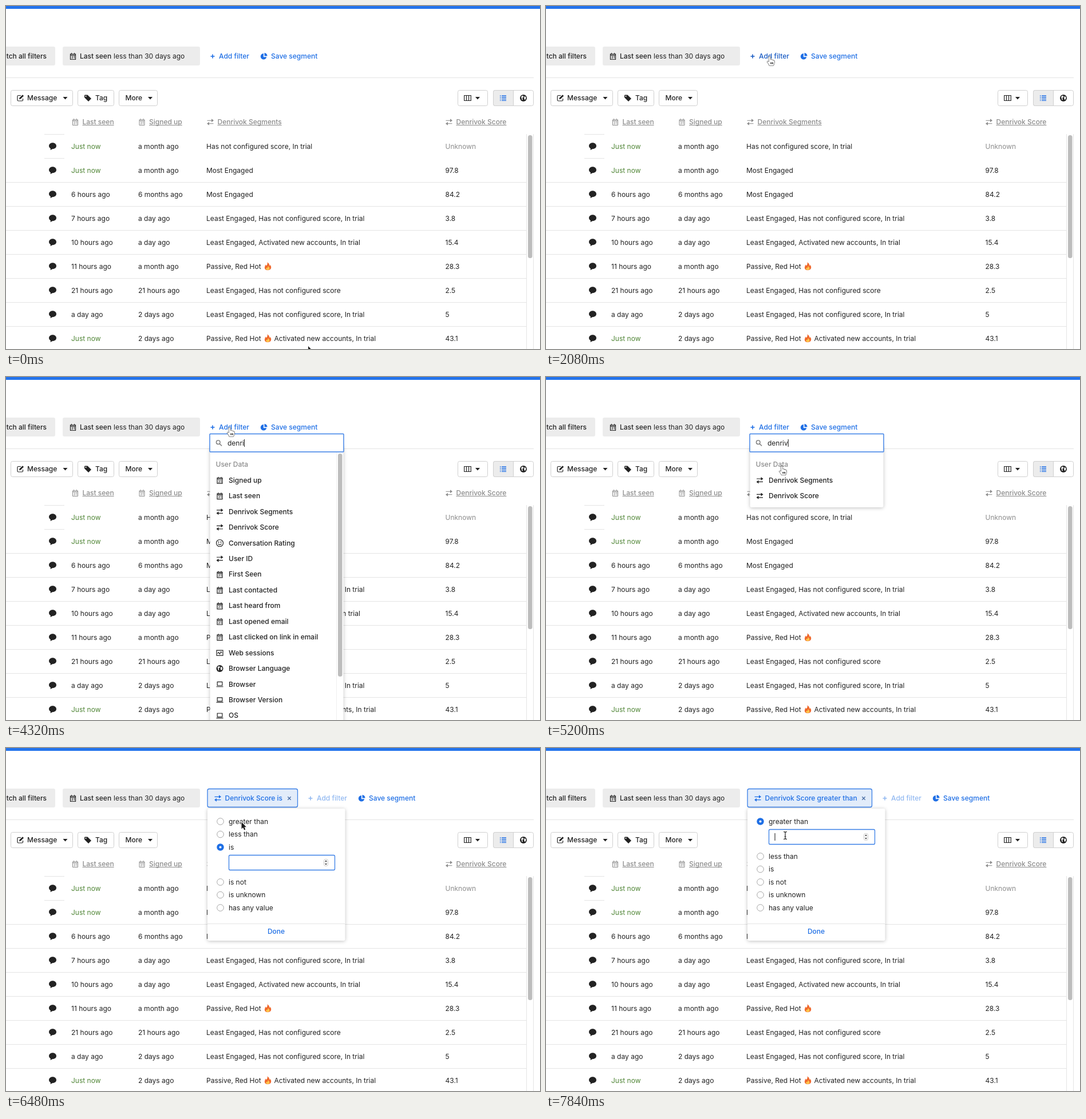
Animation, 933 px wide and 600 px high, one loop 8 s. Source, as an HTML page with a canvas:

```html
<!DOCTYPE html>
<html lang="en">
<head>
<meta charset="utf-8">
<title>Segment filter</title>
<style>
html, body { margin: 0; width: 100%; height: 100%; overflow: hidden; background: #fff; }
canvas { display: block; }
</style>
</head>
<body>
<canvas id="stage" width="933" height="600"></canvas>
<script>
const ctx = document.getElementById('stage').getContext('2d');
const LOOP = 8000, STEP = 80;
const INK = '#222', BLUE = '#1f6fe5', GREY = '#8c8c8c', LINE = '#e4e4e4';
const BRAND = 'Denrivok';

// Timeline of the interaction, in ms
const HOVER = 2000, OPEN = 3120, TYPE = 4160, NARROW = 4400, PICK = 5600, GREATER = 6560;

const ROWS = [
  ['Just now', 'a month ago', 'Has not configured score, In trial', 'Unknown'],
  ['Just now', 'a month ago', 'Most Engaged', '97.8'],
  ['6 hours ago', '6 months ago', 'Most Engaged', '84.2'],
  ['7 hours ago', 'a day ago', 'Least Engaged, Has not configured score, In trial', '3.8'],
  ['10 hours ago', 'a day ago', 'Least Engaged, Activated new accounts, In trial', '15.4'],
  ['11 hours ago', 'a month ago', 'Passive, Red Hot |', '28.3'],
  ['21 hours ago', '21 hours ago', 'Least Engaged, Has not configured score', '2.5'],
  ['a day ago', '2 days ago', 'Least Engaged, Has not configured score, In trial', '5'],
  ['Just now', '2 days ago', 'Passive, Red Hot |Activated new accounts, In trial', '43.1']
];
const FIELDS = [
  ['calendar', 'Signed up'], ['calendar', 'Last seen'],
  ['swap', BRAND + ' Segments'], ['swap', BRAND + ' Score'],
  ['smile', 'Conversation Rating'], ['swap', 'User ID'],
  ['calendar', 'First Seen'], ['calendar', 'Last contacted'],
  ['calendar', 'Last heard from'], ['calendar', 'Last opened email'],
  ['calendar', 'Last clicked on link in email'], ['session', 'Web sessions'],
  ['globe', 'Browser Language'], ['laptop', 'Browser'],
  ['laptop', 'Browser Version'], ['laptop', 'OS']
];
const OPTIONS = ['greater than', 'less than', 'is', 'is not', 'is unknown', 'has any value'];

// Pointer stops: time, x, y
const STOPS = [
  [0, 528, 595], [160, 528, 590], [400, 522, 570], [800, 436, 288], [960, 431, 275],
  [1280, 402, 120], [1440, 393, 96], [1520, 391, 90], [4880, 391, 90],
  [5440, 428, 208], [5600, 430, 206], [6000, 427, 165], [6400, 412, 130],
  [6560, 411, 129], [6720, 408, 166], [6880, 408, 176], [6960, 409, 175],
  [7360, 418, 153], [8000, 418, 153]
];

// Each icon: stroked outline, then filled parts
const ICONS = {
  calendar: ['M-4.5-4H4.5V5.5H-4.5ZM-4.5-2.2H4.5M-2.5-6V-4M2.5-6V-4', ''],
  swap: ['M-5.5-2.7H3M5.5 2.7H-3', 'M2-5.7L6-2.7L2 .3ZM-2-.3L-6 2.7L-2 5.7Z'],
  smile: ['M6 0A6 6 0 1 1-6 0A6 6 0 1 1 6 0M-3 1.2Q0 5 3 1.2', 'M-2.8-2.8h1.6v2h-1.6ZM1.2-2.8h1.6v2h-1.6Z'],
  session: ['M-5.5-4.5H5.5V4.5H-5.5ZM-4 1L-2-1L0 2L2-2L4 0', ''],
  globe: ['', 'M6 0A6 6 0 1 1-6 0A6 6 0 1 1 6 0'],
  laptop: ['M-4.3-4.2H4.3V2.2H-4.3ZM-6 4.2H6', ''],
  bubble: ['', 'M0-6C4-6 6.5-3.5 6.5-.5S4 4.7 0 4.8L-4 6.8L-3.6 3.9C-5.5 3-6.5 1.3-6.5-.5C-6.5-3.5-4-6 0-6Z'],
  compose: ['M1-4.5H-3.5Q-5-4.5-5-3V3.5Q-5 5-3.5 5H3Q4.5 5 4.5 3.5V1', 'M-2 2.2L-1.4-.4L4-5.8L6-3.8L.6 1.6Z'],
  tag: ['', 'M-6-4.5Q-6-5.5-5-5.5H-.5L6 1L1 6L-6-1Z'],
  down: ['', 'M-4-2H4L0 2.4Z'],
  columns: ['M-5.8-4.5H5.8V4.5H-5.8ZM-2-4.5V4.5M2-4.5V4.5', ''],
  list: ['M-2.5-4H5.5M-2.5-1.2H5.5M-2.5 1.6H5.5M-2.5 4.4H5.5M-5.5-4H-4M-5.5-1.2H-4M-5.5 1.6H-4M-5.5 4.4H-4', ''],
  plus: ['M-3.5 0H3.5M0-3.5V3.5', ''],
  close: ['M-2.7-2.7L2.7 2.7M2.7-2.7L-2.7 2.7', ''],
  pie: ['', 'M-.6-5A5.3 5.3 0 1 0 4.8 1.2H-.6ZM1-6A5.3 5.3 0 0 1 6-.4H1Z'],
  search: ['M2-1.3A3.3 3.3 0 1 1-4.6-1.3A3.3 3.3 0 1 1 2-1.3M1.2 1.2L5 5', '']
};
const CURSORS = {
  arrow: 'M0 0V12L2.7 9.6L4.7 14L6.8 13L4.9 8.8H8.4Z',
  hand: 'M-1.5-1Q0-2.6 1.4-1V4.2Q3-.2 3.9 4.6Q5.6 3.6 6 5.4Q8 4.8 8 7V9.5Q7.6 12 6.3 14H-.8Q-2-10 .0 14Q-2 10.8-4.6 8Q-4.4 5.6-1.5 8Z',
  beam: 'M-3-6.5Q0-6.5 0-5V5Q0 6.5-3 6.5M3-6.5Q0-6.5 0-5M3 6.5Q0 6.5 0 5M-1.5 2H1.5'
};
CURSORS.hand = 'M-1.5-1Q0-2.6 1.4-1V4.2Q3 2.8 3.9 4.6Q5.6 3.6 6 5.4Q8 4.8 8 7V9.5Q7.6 12 6.3 14H-.8Q-2 10.8-4.6 8Q-4.4 5.6-1.5 8Z';

function text(str, x, y, color = INK, weight = 400, align = 'left') {
  ctx.font = `${weight} 12px Inter, sans-serif`;
  ctx.textAlign = align;
  ctx.fillStyle = color;
  ctx.fillText(str, x, y + 4.5);
  return ctx.measureText(str).width;
}

function rect(x, y, w, h, fill, stroke, radius = 0, width = 1) {
  ctx.beginPath();
  ctx.roundRect(x, y, w, h, radius);
  if (fill) { ctx.fillStyle = fill; ctx.fill(); }
  if (stroke) { ctx.strokeStyle = stroke; ctx.lineWidth = width; ctx.stroke(); }
}

const hline = (x, y, w, color = LINE) => rect(x, y, w, 1, color);

function panel(x, y, w, h) {
  ctx.save();
  ctx.shadowColor = 'rgba(0,0,0,.25)';
  ctx.shadowBlur = 6;
  ctx.shadowOffsetY = 1;
  rect(x, y, w, h, '#fff', null, 3);
  ctx.restore();
}

function icon(name, x, y, color = INK, width = 1.2) {
  const [outline, solid] = ICONS[name];
  ctx.save();
  ctx.translate(x, y);
  ctx.strokeStyle = ctx.fillStyle = color;
  ctx.lineWidth = width;
  ctx.stroke(new Path2D(outline));
  ctx.fill(new Path2D(solid));
  if (name === 'calendar') {
    ctx.font = '600 6px Inter, sans-serif';
    ctx.textAlign = 'center';
    ctx.fillText('31', 0, 4);
  } else if (name === 'globe') {
    ctx.fillStyle = '#fff';
    ctx.fill(new Path2D('M-4-2.5L-1-4.5L.5-2L-2 0L-1 2.5L-2.5 3.5L-3.2 .5ZM2-3.5L4.5-1.5L4 2L2 3L1.2 0Z'));
  } else if (name === 'tag') {
    ctx.fillStyle = '#fff';
    ctx.fillRect(-4.4, -4, 1.8, 1.8);
  }
  ctx.restore();
}

function flame(x, y) {
  ctx.save();
  ctx.translate(x, y);
  ctx.fillStyle = '#f0682c';
  ctx.fill(new Path2D('M-1-7C3-4.5 2.5-2 3.5-.5Q4.3-1.5 4-3C6 0 6.5 3 4.5 5.2Q2.5 7-.2 7C-4.5 7-6.5 3.5-5.2 .5Q-4.6-1-4.5-3Q-3.2-1.8-3-.8C-1-2.5-.2-4.5-1-7Z'));
  ctx.fillStyle = '#fcc54c';
  ctx.fill(new Path2D('M.5-1C1 1.5 3.6 2 3 4.6Q2.2 6.6-.2 6.6C-3 6.6-4 4.2-2.6 2.2Q-1.8 3-1.6 3.4Q.3 1.5 .5-1Z'));
  ctx.restore();
}

function button(x, w, label, labelX, glyph, glyphX, arrowX) {
  rect(x + .5, 147.5, w - 1, 27, '#fff', '#cfcfcf', 3);
  if (glyph) icon(glyph, glyphX, 161);
  text(label, labelX, 160.5, INK, 500);
  if (arrowX) icon('down', arrowX, 161);
}

function heading(glyph, label, x) {
  icon(glyph, x, 203, GREY, 1);
  const left = x + 12.5;
  hline(left, 208, text(label, left, 202.5, GREY, 500), GREY);
}

function drawTable(t) {
  const dull = (t >= 400 && t < 1600) || (t >= 6880 && t < 7600);
  const live = dull ? '#707070' : '#4e8434';
  heading('calendar', 'Last seen', 121);
  heading('calendar', 'Signed up', 237.5);
  heading('swap', BRAND + ' Segments', 357);
  heading('swap', BRAND + ' Score', 774);
  hline(67, 224, 35);
  hline(67, 266, 35);
  ROWS.forEach(([seen, signed, segments, score], i) => {
    const y = 245.3 + 42 * i;
    if (i > 1) hline(0, 224 + 42 * i, 909);
    icon('bubble', 81.5, y);
    text(seen, 114, y, seen === 'Just now' ? live : INK);
    text(signed, 231, y);
    const [before, after] = segments.split('|');
    text(before, 350, y);
    if (after !== undefined) {
      flame(457.5, y);
      text(after, 468.5, y);
    }
    text(score, 767.5, y, score === 'Unknown' ? GREY : INK);
  });
  rect(909, 224, 1, 376, LINE);
  rect(921, 224, 1, 376, LINE);
  rect(912, 226, 7.5, 215, '#bdbdbd', null, 3.5);
}

function drawToolbar() {
  button(8, 109, 'Message', 37, 'compose', 25, 103.5);
  button(125, 64, 'Tag', 156, 'tag', 143);
  button(197, 68, 'More', 208.5, null, 0, 252);
  button(789, 53, '', 0, 'columns', 806.5, 824);
  button(851, 71, '', 0, 'globe', 904);
  rect(851.5, 147.5, 35, 27, '#ececec', '#cfcfcf', [3, 0, 0, 3]);
  icon('list', 868.5, 161, BLUE, 1.4);
}

function drawFilters(t) {
  rect(-5, 71, 91, 33, '#ececec', null, 3);
  text('Match all filters', 71, 87.5, INK, 500, 'right');
  rect(99, 71, 240, 33, '#ececec', null, 3);
  icon('calendar', 117, 88);
  text('Last seen', 129, 87.5, INK, 500);
  text('less than 30 days ago', 188, 87.5);

  const picked = t >= PICK, greater = t >= GREATER;
  const shift = picked ? (greater ? 231 : 171) : 0;
  if (picked) {
    const right = greater ? 570 : 510;
    rect(352, 71.5, right - 352.5, 32, '#e2ecfa', '#3a7fe6', 3, 1.3);
    icon('swap', 370, 88, BLUE);
    text(`${BRAND} Score ${greater ? 'greater than' : 'is'}`, 382.5, 87.5, BLUE, 500);
    icon('close', right - 15, 88, '#4b6fa5', 1.4);
  }
  const addColor = picked ? '#92b9f1' : t >= HOVER && t < OPEN ? '#1a5cc4' : BLUE;
  icon('plus', 361 + shift, 88, addColor, 1.6);
  text('Add filter', 372 + shift, 87.5, addColor, 500);
  icon('pie', 450.5 + shift, 88, BLUE);
  text('Save segment', 463 + shift, 87.5, BLUE, 500);
}

function drawSearch(t) {
  const narrow = t >= NARROW;
  const fields = narrow ? FIELDS.filter(f => f[1].startsWith(BRAND)) : FIELDS;
  panel(356.5, 120, 233, narrow ? 108 : 500);
  text('User Data', 366.5, 152.8, GREY, 500);
  fields.forEach(([glyph, label], i) => {
    const y = 180.2 + 27.45 * i;
    icon(glyph, 373.5, y + .5);
    text(label, 389, y, INK, 500);
  });
  if (!narrow) {
    rect(577, 132, 1, 468, '#efefef');
    rect(580, 134, 7.5, 390, '#bdbdbd', null, 3.5);
  }
  rect(356, 99.5, 234, 31.5, '#fff', '#3a7fe6', 1, 1.4);
  icon('search', 372, 115.5, '#777', 1.4);
  const count = t < TYPE ? 0 : Math.min(6, 3 + (t - TYPE) / STEP);
  const width = text(BRAND.toLowerCase().slice(0, count), 387, 115.5);
  const hidden = (t >= 3520 && t < 4000) || (t >= 4720 && t < 5200);
  if (!hidden) rect(387 + width, 109, 1, 13, '#111');
}

function drawConditions(t) {
  const chosen = t >= GREATER ? 0 : 2;
  panel(352, 106, 240.5, 231);
  OPTIONS.forEach((label, i) => {
    const y = 128 + 22.5 * i + (i > chosen ? 38.5 : 0);
    const on = i === chosen;
    ctx.beginPath();
    ctx.arc(374.5, y + .5, on ? 6.2 : 5.8, 0, 7);
    ctx.fillStyle = on ? BLUE : '#fff';
    ctx.fill();
    if (on) {
      ctx.beginPath();
      ctx.arc(374.5, y + .5, 2, 0, 7);
      ctx.fillStyle = '#fff';
      ctx.fill();
      drawNumberInput(y + 27.5, t);
    } else {
      ctx.strokeStyle = '#a5a5a5';
      ctx.lineWidth = 1;
      ctx.stroke();
    }
    text(label, 389, y);
  });
  hline(352, 307, 240);
  text('Done', 472, 320.8, BLUE, 500, 'center');
}

function drawNumberInput(y, t) {
  rect(389.5, y - 13, 185, 26, '#fff', '#3a7fe6', 2, 1.3);
  rect(555.5, y - 6, 7, 12, '#fff', '#c8c8c8', 3);
  ctx.fillStyle = '#555';
  ctx.fill(new Path2D(`M557 ${y - 1.5}h4l-2-3ZM557 ${y + 1.5}h4l-2 3Z`));
  if (t >= GREATER && Math.floor((t - GREATER) / 480) % 2 === 0) rect(399.5, y - 6.5, 1, 13, '#111');
}

function pointerAt(t) {
  const i = STOPS.findIndex(s => s[0] > t);
  const [t0, x0, y0] = STOPS[i - 1], [t1, x1, y1] = STOPS[i];
  const k = (t - t0) / (t1 - t0);
  return [x0 + (x1 - x0) * k, y0 + (y1 - y0) * k];
}

function pointerKind(t, y) {
  if (t >= GREATER) return y >= 142 ? 'beam' : 'arrow';
  if (t >= PICK || t < HOVER) return 'arrow';
  return t > 4880 && y > 98 && y < 132 ? 'beam' : 'hand';
}

function drawPointer(t) {
  const [x, y] = pointerAt(t);
  const kind = pointerKind(t, y);
  const shape = new Path2D(CURSORS[kind]);
  ctx.save();
  ctx.translate(x, y);
  ctx.lineJoin = 'round';
  if (kind === 'beam') {
    ctx.strokeStyle = '#fff';
    ctx.lineWidth = 2.4;
    ctx.stroke(shape);
    ctx.strokeStyle = '#222';
    ctx.lineWidth = 1.2;
    ctx.stroke(shape);
  } else {
    const hand = kind === 'hand';
    ctx.strokeStyle = hand ? '#222' : '#fff';
    ctx.lineWidth = hand ? 1.1 : 1.6;
    ctx.fillStyle = hand ? '#fff' : '#1a1a1a';
    ctx.stroke(shape);
    ctx.fill(shape);
    if (hand) ctx.stroke(new Path2D('M1.6 8.5V11.5M3.6 8.5V11.5M5.4 8.5V11.5'));
  }
  ctx.restore();
}

function draw(now) {
  const t = Math.floor(now % LOOP / STEP) * STEP;
  rect(0, 0, 933, 600, '#fff');
  rect(0, 0, 933, 5, '#2474ec');
  hline(0, 125, 922);
  drawToolbar();
  drawTable(t);
  drawFilters(t);
  if (t >= PICK) drawConditions(t);
  else if (t >= OPEN) drawSearch(t);
  drawPointer(t);
}

const start = performance.now();
function tick() {
  draw(performance.now() - start);
  requestAnimationFrame(tick);
}
tick();
</script>
</body>
</html>
```
